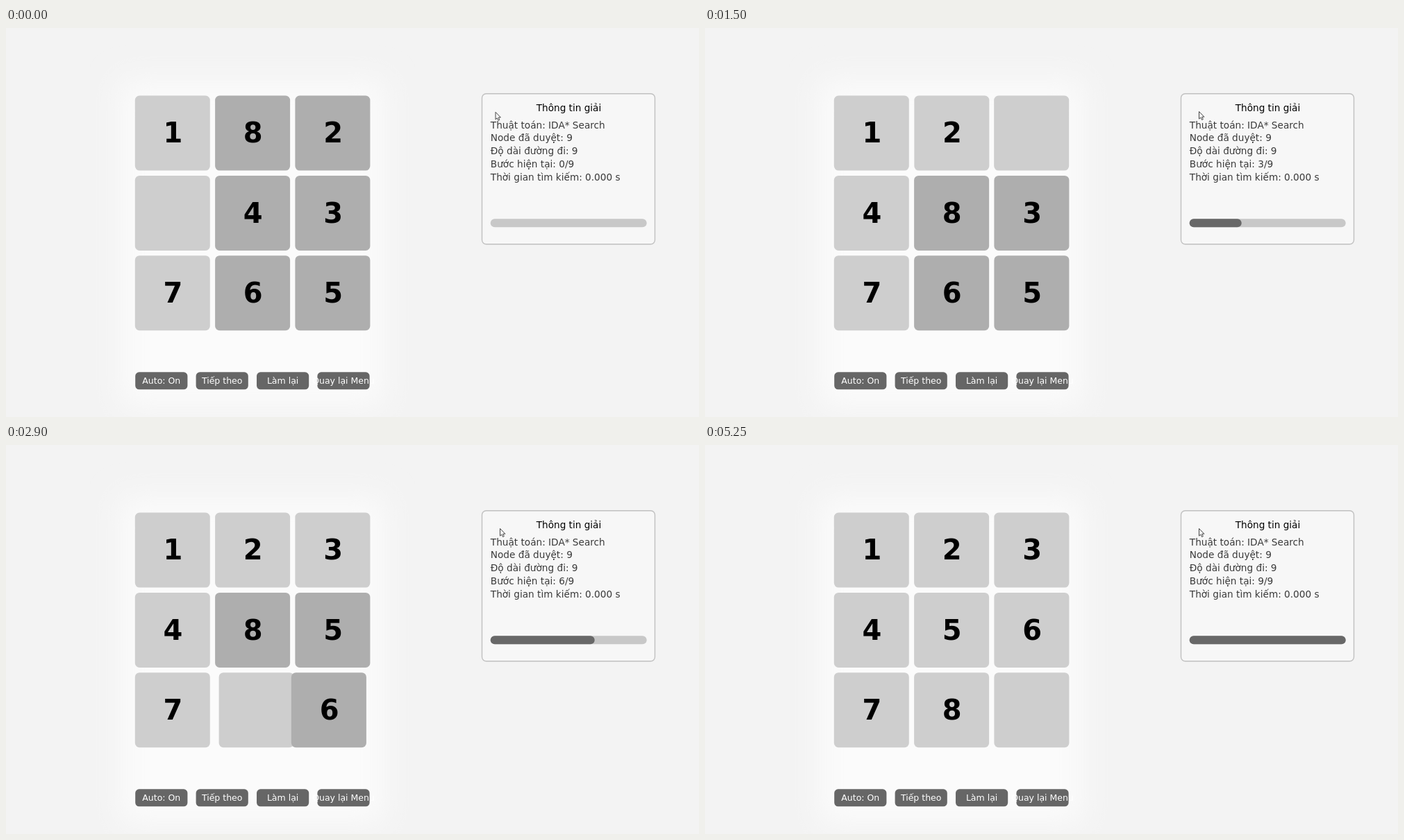
An HTML page for the animation above (5400 ms loop, 998 by 561 pixels).

```html
<!DOCTYPE html>
<html lang="vi">
<head>
<meta charset="utf-8">
<title>8-puzzle</title>
<style>
  html, body { margin: 0; width: 100%; height: 100%; overflow: hidden; background: #f3f3f3; }
  svg { display: block; width: 998px; height: 561px; font-family: "DejaVu Sans", sans-serif; }
  .num { font-size: 40px; font-weight: bold; text-anchor: middle; }
  .info { font-size: 13.65px; fill: #3a3a3a; }
  .title { font-size: 13.6px; text-anchor: middle; }
  .label { font-size: 12.5px; fill: #fff; text-anchor: middle; }
</style>
</head>
<body>
<svg id="stage" viewBox="0 0 998 561">
  <defs>
    <filter id="soft" x="-50%" y="-50%" width="200%" height="200%">
      <feGaussianBlur stdDeviation="22"/>
    </filter>
  </defs>
  <rect width="998" height="561" fill="#f3f3f3"/>
  <rect x="165" y="76" width="380" height="470" fill="#fbfbfb" filter="url(#soft)"/>
  <g id="board"></g>
  <g id="buttons"></g>
  <rect x="685.5" y="94.7" width="249" height="217" rx="6" fill="#f7f7f7" stroke="#c0c0c0" stroke-width="1.4"/>
  <text class="title" x="810.5" y="119.5">Thông tin giải</text>
  <g id="lines"></g>
  <rect x="697.7" y="275.3" width="225" height="12" rx="6" fill="#c8c8c8"/>
  <rect id="bar" x="697.7" y="275.3" height="12" rx="6" fill="#686868"/>
  <path id="cursor" d="M0 0V10.6L2.4 8.5L4 12L5.8 11.2L4.2 7.7H7.4Z" fill="#fafafa" stroke="#444" stroke-linejoin="round"/>
</svg>
<script>
const LOOP = 5400, TICK = 50, SLIDE = 400;
const SIZE = 108, LEFT = 185.8, TOP = 97.6, PITCH = 115.3;
const LIGHT = '#cecece', DARK = '#aeaeae';
const START = [1, 8, 2, 0, 4, 3, 7, 6, 5];
const GOAL = [1, 2, 3, 4, 5, 6, 7, 8, 0];

// [start time, cell the gap moves to]
const MOVES = [
  [120, 4], [625, 1], [1150, 2], [1628, 5], [2140, 8],
  [2645, 7], [3140, 4], [3645, 5], [4145, 8]
];

const $ = id => document.getElementById(id);

function add(parent, tag, attrs, text) {
  const el = document.createElementNS('http://www.w3.org/2000/svg', tag);
  for (const key in attrs) el.setAttribute(key, attrs[key]);
  if (text !== undefined) el.textContent = text;
  return parent.appendChild(el);
}

const place = (el, x, y) => el.setAttribute('transform', `translate(${x} ${y})`);
const easeOut = p => 1 - (1 - p) ** 3;
const clamp = v => Math.min(1, Math.max(0, v));
const cellAt = i => [LEFT + i % 3 * PITCH, TOP + Math.floor(i / 3) * PITCH];

// The gap comes first, so tiles slide over it.
const tiles = [0, 1, 2, 3, 4, 5, 6, 7, 8].map(n => {
  const g = add($('board'), 'g', {});
  const box = add(g, 'rect', { width: SIZE, height: SIZE, rx: 6.5, fill: LIGHT });
  if (n) add(g, 'text', { class: 'num', x: 54.7, y: 67.8 }, n);
  return { g, box };
});

['Auto: On', 'Tiếp theo', 'Làm lại', 'Quay lại Menu'].forEach((label, i) => {
  const x = 186.2 + i * 87.4;
  add($('buttons'), 'rect', { x, y: 496.3, width: 75.2, height: 25, rx: 5.5, fill: '#666' });
  add($('buttons'), 'text', { class: 'label', x: x + 37.6, y: 513.3 }, label);
});

const lines = [
  'Thuật toán: IDA* Search', 'Node đã duyệt: 9', 'Độ dài đường đi: 9',
  'Bước hiện tại: 0/9', 'Thời gian tìm kiếm: 0.000 s'
].map((s, i) => add($('lines'), 'text', { class: 'info', x: 697.8, y: 144.5 + i * 18.75 }, s));

// Board layout after each move
const states = [START];
for (const [, to] of MOVES) {
  const next = [...states[states.length - 1]];
  const gap = next.indexOf(0);
  [next[gap], next[to]] = [next[to], 0];
  states.push(next);
}

function draw(t) {
  const step = MOVES.filter(m => m[0] <= t).length;
  const now = states[step], before = states[Math.max(0, step - 1)];
  const k = step ? easeOut(clamp((t - MOVES[step - 1][0]) / SLIDE)) : 1;

  tiles.forEach(({ g, box }, n) => {
    const cell = now.indexOf(n);
    const [x0, y0] = cellAt(before.indexOf(n)), [x1, y1] = cellAt(cell);
    place(g, x0 + (x1 - x0) * k, y0 + (y1 - y0) * k);
    box.setAttribute('fill', !n || GOAL[cell] === n ? LIGHT : DARK);
  });

  lines[3].textContent = `Bước hiện tại: ${step}/9`;
  $('bar').setAttribute('width', 225 * step / 9);

  const c = clamp(t / 200);
  place($('cursor'), 705 + 6.5 * c, 121.3 - 0.8 * c);
}

function frame() {
  const t = performance.now() % LOOP;
  draw(Math.floor(t / TICK) * TICK);
  requestAnimationFrame(frame);
}
frame();
</script>
</body>
</html>
```
